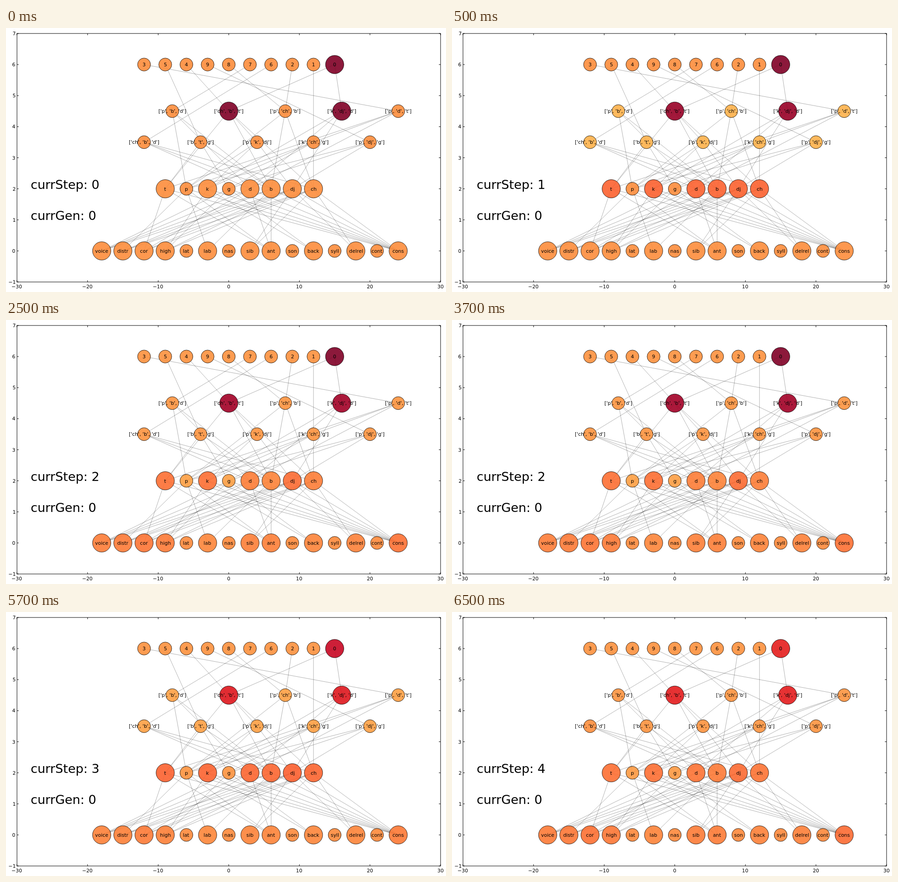
Write an HTML page with a canvas that moves like this. It is 967 by 579 pixels and loops after 8000 ms.

```html
<!DOCTYPE html>
<html>
<head>
<meta charset="utf-8">
<style>
html, body { margin: 0; width: 100%; height: 100%; overflow: hidden; background: #fff; }
canvas { display: block; }
</style>
</head>
<body>
<canvas id="stage" width="967" height="579"></canvas>
<script>
const ctx = document.getElementById('stage').getContext('2d');
const X = v => 489.6 + v * 15.515;
const Y = v => 488.9 - v * 68.125;
const LOOP = 8000, STARTS = [0, 500, 2500, 4500, 6500];
const SMALL = 10.9, LARGE = 27.2;

// Yellow-orange-red colour scale, sampled at even steps.
const SCALE = ['ffffcc', 'ffeda0', 'fed976', 'feb24c', 'fd8d3c', 'fc4e2a', 'e31a1c', 'bd0026', '800026']
  .map(h => [0, 2, 4].map(i => parseInt(h.slice(i, i + 2), 16)));

function colour(v) {
  const p = v * 8, i = Math.min(7, Math.floor(p));
  const rgb = SCALE[i].map((a, c) => Math.round(a + (SCALE[i + 1][c] - a) * (p - i)));
  return `rgb(${rgb})`;
}

const nodes = {}, edges = [];
const add = (id, x, y, big, values, label = id) => { nodes[id] = { x: X(x), y: Y(y), big, values, label }; };
const link = (a, list) => list.split(' ').forEach(b => edges.push([nodes[a], nodes[b]]));

// Features
const weights = [4, 4.5, 6, 4.5, 1, 2, 1, 3.5, 3.5, 1, 2.5, 1, 3, 1, 7];
'voice distr cor high lat lab nas sib ant son back syll delrel cont cons'.split(' ').forEach((id, i) => {
  const w = weights[i];
  add(id, i * 3 - 18, 0, w >= 2, [0, 0, .0078, .0058, .0095].map(s => .5 + w * s));
});

// Sounds
const levels = [
  [.56, .435, .56, .44, .53, .52, .565, .53],
  [.585, .475, .583, .48, .575, .578, .59, .58],
  [.56, .455, .56, .46, .55, .535, .567, .55]
];
const sounds = {
  t: 'cor ant', p: 'distr lab ant', k: 'high back', g: 'voice high back',
  d: 'voice cor ant', b: 'voice distr lab ant',
  dj: 'voice distr cor high sib delrel', ch: 'distr cor high sib delrel'
};
Object.keys(sounds).forEach((id, i) => {
  const big = id !== 'p' && id !== 'g';
  add(id, i * 3 - 9, 2, big, [.5, big ? .585 : .5, ...levels.map(l => l[i])]);
  link(id, sounds[id] + ' cons');
});

// Words
const words = ['ch b d', 'p b d', 'b t g', 'ch b t', 'p k dj', 'p ch b', 'k ch g', 'k dj d', 'p dj g', 'p d t'];
words.forEach((w, i) => {
  const id = w.replace(/ /g, '-'), big = i === 3 || i === 7;
  const label = '[' + w.split(' ').map(s => `'${s}'`).join(', ') + ']';
  add(id, i * 4 - 12, i % 2 ? 4.5 : 3.5, big,
    big ? [1, .95, .93, .765, .745] : [.5, .38, .48, .435, i ? .48 : .495], label);
  link(id, w);
});

// Meanings
const meanings = [
  [3, 'p-d-t'], [5, 'b-t-g'], [4, 'p-k-dj'], [9, 'p-dj-g'], [8, 'p-ch-b'],
  [7, 'p-b-d'], [6, 'ch-b-d'], [2, 'p-ch-b'], [1, 'k-ch-g'], [0, 'ch-b-t k-dj-d']
];
meanings.forEach(([id, list], i) => {
  add(id, i * 3 - 12, 6, !id, id ? [.5, .5, .487, .487, .487] : [1, 1, 1, .84, .74]);
  link(id, list);
});

function line(x1, y1, x2, y2) {
  ctx.beginPath();
  ctx.moveTo(x1, y1);
  ctx.lineTo(x2, y2);
  ctx.stroke();
}

// Aligns by the visible ink: anchor 0 is left, .5 centre, 1 right.
function text(s, x, y, anchor = .5, size = SMALL) {
  ctx.font = `${size}px "DejaVu Sans", sans-serif`;
  ctx.fillStyle = '#000';
  const { actualBoundingBoxLeft: l, actualBoundingBoxRight: r } = ctx.measureText(s);
  ctx.fillText(s, x + l - anchor * (l + r), y);
}

function drawAxes() {
  const l = X(-30), r = X(30), t = Y(7), b = Y(-1), len = 3.7;
  const name = v => String(v).replace('-', '\u2212');
  ctx.strokeStyle = '#000';
  ctx.lineWidth = 1;
  ctx.strokeRect(l, t, r - l, b - t);
  for (let v = -30; v <= 30; v += 10) {
    const x = X(v);
    line(x, b, x, b - len);
    line(x, t, x, t + len);
    text(name(v), x, 571);
  }
  for (let v = -1; v <= 7; v++) {
    const y = Y(v);
    line(l, y, l + len, y);
    line(r, y, r - len, y);
    text(name(v), l - 3.7, y + 4, 1);
  }
}

function draw(step) {
  ctx.fillStyle = '#fff';
  ctx.fillRect(0, 0, 967, 579);

  ctx.globalAlpha = .35;
  ctx.strokeStyle = '#000';
  ctx.lineWidth = .91;
  edges.forEach(([a, b]) => line(a.x, a.y, b.x, b.y));

  ctx.globalAlpha = .9;
  for (const n of Object.values(nodes)) {
    ctx.beginPath();
    ctx.arc(n.x, n.y, n.big ? 20.1 : 14.2, 0, Math.PI * 2);
    ctx.fillStyle = colour(n.values[step]);
    ctx.fill();
    ctx.stroke();
  }

  ctx.globalAlpha = 1;
  for (const n of Object.values(nodes)) text(n.label, n.x, n.y + 4);
  text('currStep: ' + step, X(-28), Y(2) + .5, 0, LARGE);
  text('currGen: 0', X(-28), Y(1) + .5, 0, LARGE);
  drawAxes();
}

const origin = performance.now();
let shown = -1;

function tick() {
  const t = (performance.now() - origin) % LOOP;
  const step = STARTS.filter(s => s <= t).length - 1;
  if (step !== shown) draw(shown = step);
  requestAnimationFrame(tick);
}
tick();
</script>
</body>
</html>
```
